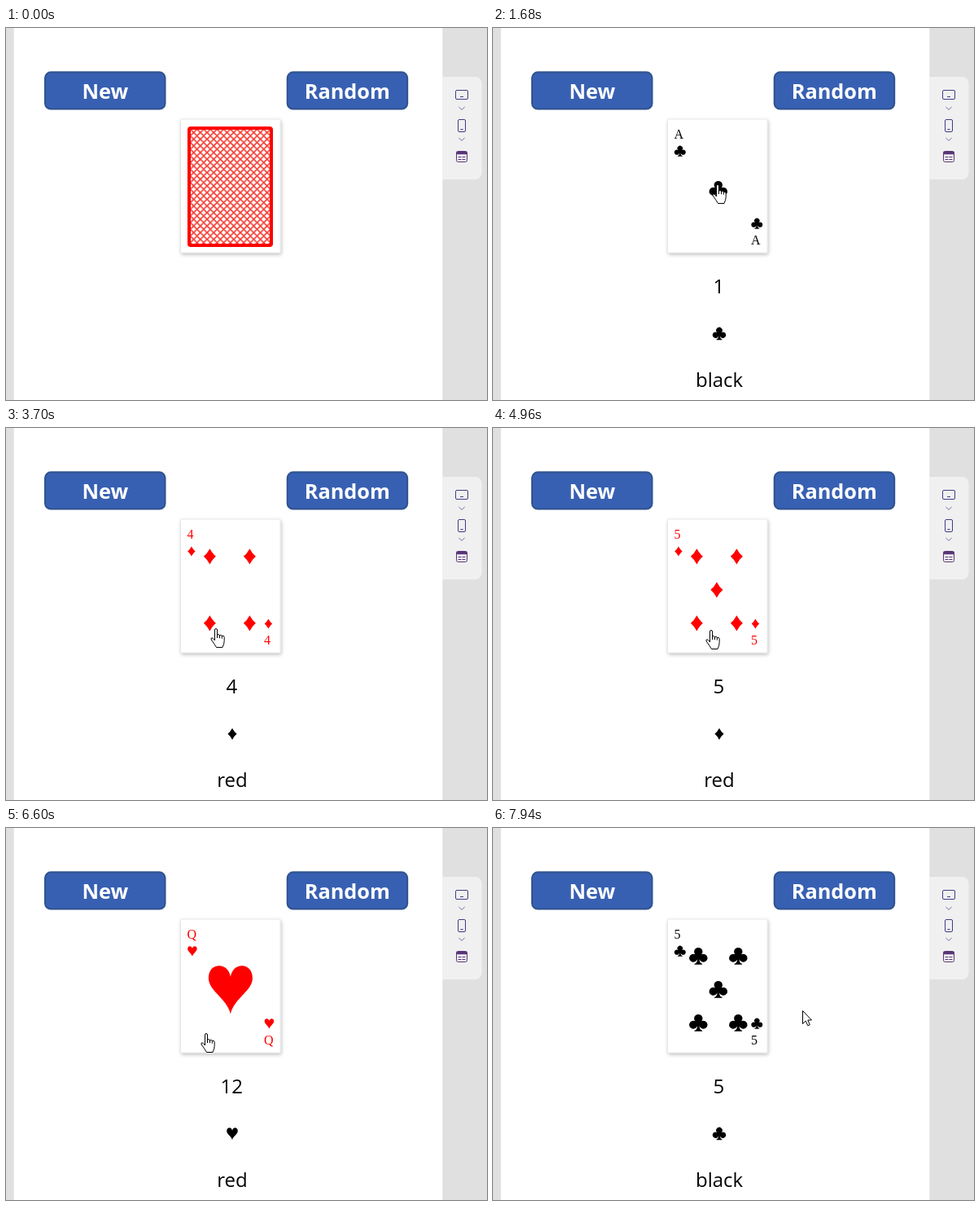
Animation, 591 px wide and 457 px high, one loop 8 s. Source, as an HTML page:

```html
<!DOCTYPE html>
<html lang="en">
<head>
<meta charset="utf-8">
<title>Card flip</title>
<style>
  html, body { margin: 0; width: 100%; height: 100%; overflow: hidden; background: #fff; }
  svg { display: block; }
  .button rect { fill: #3860b2; stroke: #2f528f; stroke-width: 2; }
  .button text { font: 700 25.33px "Open Sans", sans-serif; fill: #fff; text-anchor: middle; }
  .label { font: 24px "Open Sans", sans-serif; fill: #000; text-anchor: middle; }
  .rank { font: 16px "Liberation Serif", serif; }
  .icon { fill: none; stroke: #3f3d86; stroke-width: 1; }
  .pointer { fill: #fff; stroke: #000; stroke-width: 1; stroke-linejoin: round; }
</style>
</head>
<body>
<svg width="591" height="457" viewBox="0 0 591 457">
  <defs>
    <pattern id="weave" width="10" height="10" patternUnits="userSpaceOnUse"
             patternTransform="translate(214.2 112) scale(.82)">
      <path d="M-1 -1 11 11M11 -1 -1 11M-1 9 1 11M9 -1 11 1" stroke="#f5392f" stroke-width="2"/>
    </pattern>
    <filter id="shadow" x="-10%" y="-10%" width="120%" height="120%">
      <feDropShadow dx="1" dy="2" stdDeviation="2" flood-color="#000" flood-opacity=".25"/>
    </filter>
  </defs>

  <rect width="591" height="457" fill="#fff"/>
  <path d="M0 0H9.7V457H0zM536.3 0H591V457H536.3z" fill="#e0e0e0"/>
  <path d="M536 60H576.5a8 8 0 0 1 8 8V178a8 8 0 0 1-8 8H536z" fill="#f0f0f0"/>
  <g class="icon">
    <rect x="552.5" y="76.5" width="15" height="11" rx="1.5"/>
    <rect x="555.5" y="112.5" width="9" height="15" rx="1.5"/>
    <path d="M558 84.5h4M558.5 124.5h3"/>
    <path d="M556.3 97l3.7 3.4 3.7-3.4M556.3 135l3.7 3.4 3.7-3.4" stroke="#7573a8"/>
    <g stroke="#5a3577">
      <rect x="553.5" y="151.5" width="13" height="13" rx="2"/>
      <path d="M553.5 153.5h13" stroke-width="3.5"/>
      <path d="M555.5 158.5h9M555.5 161.5h9" stroke-dasharray="4 1"/>
    </g>
  </g>

  <g class="button">
    <rect x="48" y="54.3" width="147.5" height="45.2" rx="7"/>
    <text x="121.8" y="86.7">New</text>
  </g>
  <g class="button" transform="translate(297.7)">
    <rect x="48" y="54.3" width="147.5" height="45.2" rx="7"/>
    <text x="121.6" y="86.7">Random</text>
  </g>

  <rect x="214.5" y="112" width="122.5" height="164" rx="1.5" fill="#fff" stroke="#e8e8e8" filter="url(#shadow)"/>
  <rect id="back" x="225" y="123" width="101" height="144" rx="2" fill="url(#weave)" stroke="#f00" stroke-width="4"/>
  <g id="face"></g>
  <circle id="ring" r="11.5" fill="#888" fill-opacity=".3"/>
  <g id="hand" class="pointer">
    <path d="M-.5 15V2Q-.5.5 1 .5T2.5 2V8q1.5-1.2 3 .6 1.5-.8 2.8.7 2.9-.5 2.9 1.8V15.5Q11.2 19 9 23.5H1.5Q-.5 20-4.8 14-5.7 12-4 11.8-2.5 12-.5 15z"/>
    <path d="M2.5 8v4M5.5 8.6v3.6M8.3 9.3v3.4" fill="none"/>
  </g>
  <path id="arrow" class="pointer" d="M.5.5V16.5L4.2 13 6.8 18.8 9.3 17.7 6.8 12H11.5z"/>
</svg>
<script>
const LOOP = 8000, STEP = 68, CLICK_LEAD = 140, CLICK_LENGTH = 70;
const $ = id => document.getElementById(id);

// Suit outlines fill a unit box centred on zero; x is the upper corner mark.
const SUITS = {
  club: {
    path: "M-.05 .08A.245 .25 0 1 1-.19-.13A.25 .25 0 1 1 .19-.13A.245 .25 0 1 1 .05 .08Q.06 .42 .23 .45V.5H-.23V.45Q-.06 .42-.05 .08z",
    ink: "#000", name: "black", x: 229.8, w: 13, h: 12.5, grow: 1.6
  },
  diamond: {
    path: "M0-.5Q.2-.2 .5 0Q.2 .2 0 .5Q-.2 .2-.5 0Q-.2-.2 0-.5z",
    ink: "#f00", name: "red", x: 227.9, w: 9.4, h: 12, grow: 1.6
  },
  heart: {
    path: "M0 .5C-.08 .18-.5 .02-.5-.24C-.5-.41-.39-.5-.26-.5C-.13-.5-.03-.42 0-.27C.03-.42 .13-.5 .26-.5C.39-.5 .5-.41 .5-.24C.5 .02 .08 .18 0 .5z",
    ink: "#f00", name: "red", x: 228.9, w: 11.5, h: 12.6, grow: 4.7
  }
};

const CARDS = [
  { at: 1680, value: 1, suit: "club" },
  { at: 2690, value: 1, suit: "diamond" },
  { at: 3700, value: 4, suit: "diamond" },
  { at: 4700, value: 5, suit: "diamond" },
  { at: 5700, value: 12, suit: "heart" },
  { at: 7200, value: 5, suit: "club" }
];

// Each move starts where the previous one ended; bend is a curve control point.
const ENTRY = [372, 460];
const MOVES = [
  { at: 390, steps: 13, to: [275, 192], bend: [335, 320] },
  { at: 1930, steps: 5, to: [279, 233], bend: [283, 255] },
  { at: 2830, steps: 6, to: [257, 246], bend: [268, 250] },
  { at: 4800, steps: 3, to: [267, 248] },
  { at: 5230, steps: 2, to: [273, 260] },
  { at: 5770, steps: 5, to: [251, 232], bend: [171, 250] },
  { at: 6450, steps: 3, to: [245, 252] },
  { at: 7660, steps: 5, to: [380, 224], bend: [300, 320] }
];

const easeOut = u => 1 - (1 - u) ** 1.5;
const lerp = (a, b, u) => a.map((v, k) => v + (b[k] - v) * u);

function pointerAt(t) {
  const i = MOVES.findLastIndex(m => m.at <= t);
  if (i < 0) return null;
  const { at, steps, to, bend } = MOVES[i];
  const from = i ? MOVES[i - 1].to : ENTRY;
  const u = easeOut(Math.min(1, (Math.floor((t - at) / STEP) + 1) / steps));
  return bend ? lerp(lerp(from, bend, u), lerp(bend, to, u), u) : lerp(from, to, u);
}

// Pips sit on a 3 by 3 grid: corners from four up, centre for odd values and the queen.
function pipSpots(value) {
  const spots = value % 2 || value === 12 ? [[0, 0]] : [];
  if (value === 4 || value === 5)
    for (const i of [-1, 1]) for (const j of [-1, 1]) spots.push([i, j]);
  return spots;
}

function faceOf({ value, suit }) {
  const { path, ink, name, x, w, h, grow } = SUITS[suit];
  const rank = { 1: "A", 12: "Q" }[value] || value;
  const text = (px, py, s, cls, fill) => `<text class="${cls}" x="${px}" y="${py}" fill="${fill}">${s}</text>`;
  const pip = (px, py, k, fill) =>
    `<path d="${path}" fill="${fill}" transform="translate(${px} ${py}) scale(${w * k} ${h * k})"/>`;
  return text(222.5, 136, rank, "rank", ink) + text(317, 266, rank, "rank", ink)
    + pip(x, 151.5, 1, ink) + pip(x + 94.5, 240.5, 1, ink)
    + pipSpots(value).map(([i, j]) => pip(x + 47 + i * 24.5, 198.8 + j * 41, grow, ink)).join("")
    + text(277.3, 326, value, "label", "#000")
    + pip(278, 375.8, 1.18, "#000")
    + text(278, 441, name, "label", "#000");
}

function show(el, on) {
  el.style.display = on ? "" : "none";
}

function place(id, on, p) {
  show($(id), on);
  if (on) $(id).setAttribute("transform", `translate(${p.map(Math.round)})`);
}

let shown = null;

function draw(t) {
  const card = CARDS.findLast(c => c.at <= t);
  if (card !== shown) {
    $("face").innerHTML = card ? faceOf(card) : "";
    show($("back"), !card);
    shown = card;
  }
  const p = pointerAt(t);
  const over = !!p && p[0] > 214 && p[0] < 337 && p[1] > 112 && p[1] < 281;
  const clicking = CARDS.some(c => t >= c.at - CLICK_LEAD && t < c.at - CLICK_LEAD + CLICK_LENGTH);
  place("hand", over, p);
  place("arrow", !!p && !over, p);
  place("ring", clicking, p);
}

const start = performance.now();
function tick() {
  draw((performance.now() - start) % LOOP);
  requestAnimationFrame(tick);
}
tick();
</script>
</body>
</html>
```
